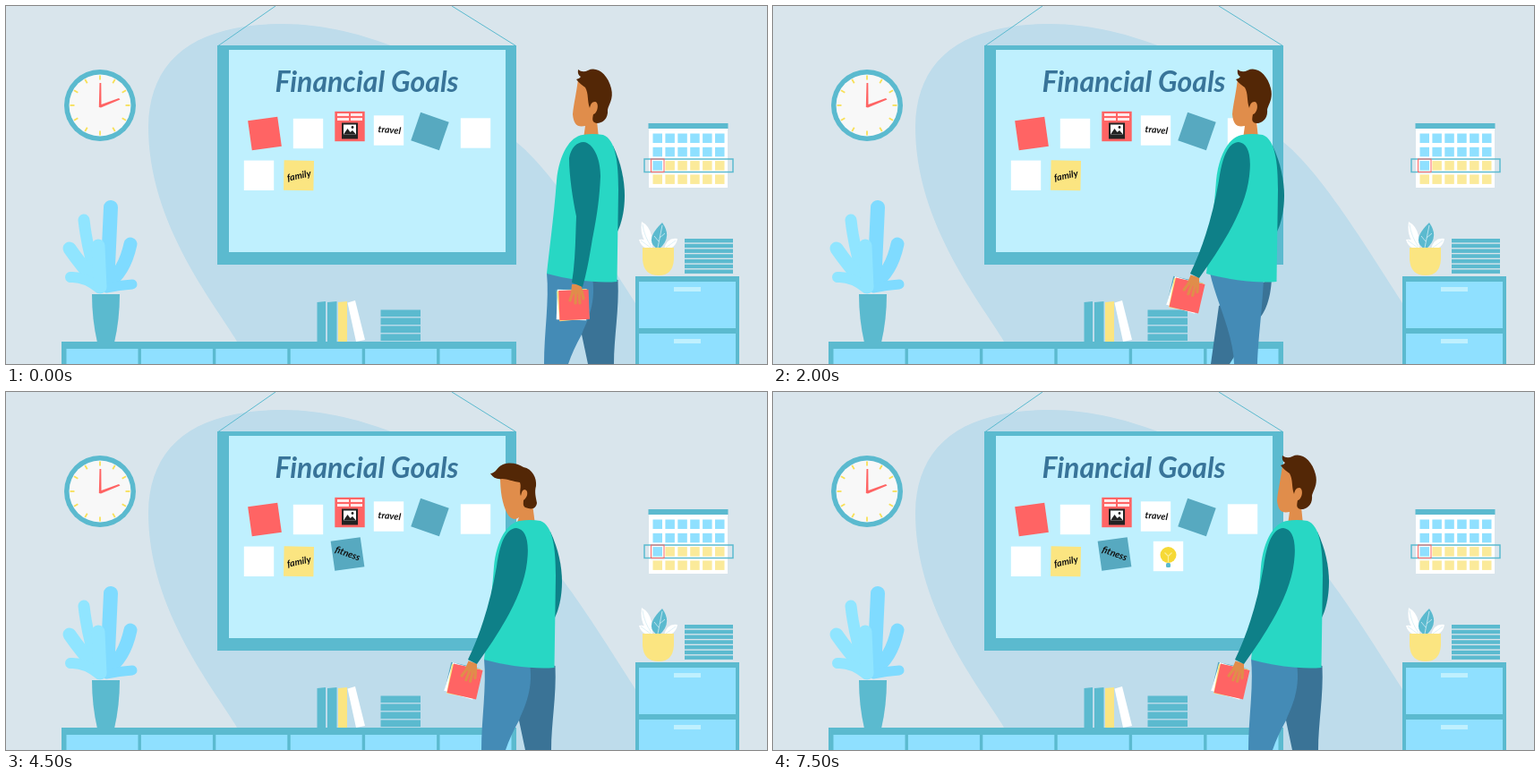
An HTML page for the animation above (8000 ms loop, 850x400 px).

```html
<!DOCTYPE html>
<html lang="en">
<head>
<meta charset="utf-8">
<title>Financial Goals</title>
<style>
  html, body { margin: 0; width: 100%; height: 100%; overflow: hidden; background: #d9e5ec; }
  svg { display: block; width: 100%; height: 100%; }
  text { font-family: Lato, "Open Sans", sans-serif; font-style: italic; font-weight: 700; text-anchor: middle; }
  .word { font-size: 10.5px; fill: #111; }
  .teal { fill: #5bbacf; }
  .sky { fill: #8fe0ff; }
  .pale { fill: #bff0fe; }
  .red { fill: #ff6464; }
  .white { fill: #fff; }
  .yellow { fill: #fbe581; }
  .note { fill: #57a9c0; }
  .skin { fill: #e08d4b; }
  .hair { fill: #532706; }
  .vest { fill: #28d7c4; }
  .sleeve { fill: #0e8088; }
  .far { fill: #0d6f74; }
  .leg { fill: #448bb6; }
  .leg2 { fill: #3a7396; }
  .lobe { fill: none; stroke-linecap: round; }
</style>
</head>
<body>
<svg viewBox="0 0 850 400" preserveAspectRatio="none">
  <defs>
    <rect id="sheet" x="-16.7" y="-16.7" width="33.4" height="33.4"/>
    <g id="fitNote">
      <use href="#sheet" class="note"/>
      <text class="word" y="3" transform="rotate(28)">fitness</text>
    </g>
    <g id="bulbNote">
      <use href="#sheet" class="white"/>
      <circle cy="-1.5" r="9" fill="#f6d936"/>
      <path d="M-4 -4L0 0L4 -4M0 0V7" fill="none" stroke="#fbee98" stroke-width="1.2"/>
      <rect x="-2.5" y="7.5" width="5" height="5" rx="1.5" class="teal"/>
    </g>
    <g id="stack">
      <use href="#sheet" class="note" transform="translate(-3 -1)"/>
      <use href="#sheet" class="white" transform="translate(-2.5) rotate(4)"/>
      <use href="#sheet" class="yellow" transform="translate(-1) rotate(-3)"/>
      <use href="#sheet" class="red"/>
    </g>
    <g id="hand">
      <path class="skin" d="M-5 -1L5 -1L8 9L-6 10Z"/>
      <path d="M-4 8L-7 17M-.5 8L-1 20M3 8L4 20M6 7L8 15" fill="none" stroke="#e08d4b" stroke-width="3.2" stroke-linecap="round"/>
    </g>
  </defs>

  <path fill="#bedceb" d="M275 400L258 375C235 335 159 245 159 135C160 60 210 20 310 20C355 20 400 32 440 48C500 75 530 120 570 152C612 186 660 265 703 332V400Z"/>

  <!-- board -->
  <path d="M237 44.500L301 0M569.500 44.500L498 0" stroke="#5bbacf" fill="none"/>
  <rect x="236" y="44" width="334" height="245" class="teal"/>
  <rect x="249" y="49" width="309" height="226" class="pale"/>
  <text x="403" y="96" font-size="32" fill="#387499">Financial Goals</text>
  <use href="#sheet" class="red" transform="translate(289 142.500) rotate(-8)"/>
  <use href="#sheet" class="white" x="337.500" y="142.500"/>
  <use href="#sheet" class="red" x="384" y="134.500"/>
  <path fill="#ffe9e9" d="M370 120h13v3h-13zM385 120h13v3h-13zM370 125h13v3h-13zM385 125h13v3h-13z"/>
  <rect x="375" y="130.500" width="18" height="18" fill="#222"/>
  <rect x="377" y="132.500" width="14" height="11" class="white"/>
  <path fill="#222" d="M377 143.500L381.500 137L384.500 141L387 139L391 143.500Z"/>
  <circle cx="387" cy="135.500" r="1.400" fill="#222"/>
  <use href="#sheet" class="white" x="427.500" y="139"/>
  <text class="word" transform="translate(428 142) rotate(5)">travel</text>
  <use href="#sheet" class="note" transform="translate(473.500 140) rotate(19)"/>
  <use href="#sheet" class="white" x="524.500" y="142"/>
  <use href="#sheet" class="white" x="282.500" y="189.300"/>
  <use href="#sheet" class="yellow" transform="translate(327 189.300) rotate(1)"/>
  <text class="word" transform="translate(328 193) rotate(-12)">family</text>
  <g id="fit" class="pose"><use href="#fitNote" transform="translate(381.500 181) rotate(-8)"/></g>
  <g id="bulb" class="pose"><use href="#bulbNote" x="441.500" y="183.500"/></g>

  <!-- clock -->
  <circle cx="105" cy="111" r="40" class="teal"/>
  <circle cx="105" cy="111" r="34.500" fill="#f8f8f8"/>
  <g id="ticks" stroke="#f8e058" stroke-width="1.800"></g>
  <path class="red" d="M103.800 113L104.500 86H106.300L106.500 110L126 103L127.500 104.500L106 113.500Z"/>

  <!-- tall plant -->
  <g class="lobe" stroke="#7fdbff">
    <path stroke-width="16" d="M117 225L113 312"/>
    <path stroke-width="15" d="M139 266Q132 298 113 310"/>
    <path stroke-width="11" d="M141 311Q126 312 113 315"/>
  </g>
  <g class="lobe" stroke="#90e5ff">
    <path stroke-width="13" d="M87 239Q91 275 104 312"/>
    <path stroke-width="15" d="M71 271Q84 290 104 312"/>
    <path stroke-width="12" d="M72 303Q88 302 104 315"/>
    <path stroke-width="15" d="M103 268L105 314"/>
  </g>
  <path class="teal" d="M96 322H127Q127 350 121 376H102Q96 350 96 322Z"/>

  <!-- sideboard and books -->
  <rect x="62" y="375" width="508" height="25" class="teal"/>
  <g id="doors" class="sky"></g>
  <path class="teal" d="M347.500 331L357 330V375H347.500ZM359 331L369.500 330V375H359Z"/>
  <path class="yellow" d="M371 331L381 330V375H371Z"/>
  <path class="white" d="M381.500 331.500L390 329L401 373L391 375Z"/>
  <g id="books" class="teal"></g>

  <!-- calendar -->
  <rect x="718" y="131" width="88" height="72" class="white"/>
  <rect x="717.500" y="131" width="89" height="6" class="teal"/>
  <g id="days"></g>
  <rect x="713" y="171" width="99" height="14.500" fill="none" stroke="#5bbacf" stroke-width="1.500"/>
  <rect x="720.500" y="171" width="14.500" height="14.500" fill="none" stroke="#f66"/>

  <!-- cabinet -->
  <rect x="703" y="302" width="116" height="98" class="teal"/>
  <path class="sky" d="M707 308H815V360H707ZM707 366H815V400H707Z"/>
  <path class="pale" d="M746 314H776V319H746ZM746 372H776V377H746Z"/>
  <path class="white" d="M710 241Q723 248 722 270Q707 262 710 241ZM707 261Q720 259 723 272Q710 272 707 261ZM750 260Q738 258 735 272Q748 272 750 260Z"/>
  <path class="teal" d="M733 242Q745 259 729 272Q711 263 733 242Z"/>
  <path d="M711 244Q713 258 721 269M748 262L737 270M709 262L720 270M733 245L728 270M730 259L736 254M729 263L724 257" fill="none" stroke="#d5edf4" stroke-width=".8"/>
  <path class="yellow" d="M711 270H746V283Q745 301 729 301Q712 301 711 283Z"/>

  <!-- man, drawn at x offset 0 -->
  <g id="man">
    <g id="rest" class="pose"><path class="sleeve" d="M608 156C617 175 621 195 621 212C621 230 617 244 613 252Z"/></g>
    <g id="pull" class="pose">
      <path class="far" d="M503 167L550 184V212L537 206L499 175Z"/>
    </g>
    <g id="reach" class="pose">
      <path class="far" d="M441 183L550 178V208L535 206L441 191Z"/>
    </g>

    <g id="stand" class="pose">
      <path class="leg2" d="M575 298L613.500 306C615 340 609 370 609 400H580L573 367Z"/>
      <path class="leg" d="M534 298L585 304C590 335 576 358 573 367Q563 385 558 400H531C531 365 537 330 534 298Z"/>
    </g>
    <g id="step" class="pose">
      <path class="leg2" d="M607 304C606 330 598 346 590 352L560 400H539L548 335Z"/>
      <path class="leg" d="M538 298L598 305C596 345 592 370 591 400H565C564 365 545 330 538 298Z"/>
    </g>

    <g id="up" class="pose">
      <path class="skin" d="M569 82C567 98 564 110 563 121C564 132 568 136 577 134L575 148H592L590 128L594 95Z"/>
      <path class="hair" d="M569 71Q574 75 580 72C590 67 602 76 606 92C609 104 603 110 602 116C603 126 596 131 590 131C584 130 585 126 586 121C591 120 593 108 588 107C584 107 583 110 582 114C579 106 581 98 577 91C574 89 570 86 567 82Q571 81 572 79Q568 77 569 71Z"/>
    </g>
    <g id="down" class="pose">
      <path class="skin" d="M552 94C552 110 554 125 560 136C564 143 569 143 573 140L570 148H591L588 125L584 96Z"/>
      <path class="hair" d="M541 91C547 91 548 84 555 81C563 78 572 80 578 84C588 86 593 96 592 105C590 112 592 118 593 124C592 130 588 132 580 129C577 127 578 124 578 121C583 118 584 109 579 109C576 110 576 113 575 116C573 111 576 106 574 101C566 100 560 97 554 97C549 98 544 96 541 91Z"/>
    </g>

    <path class="vest" d="M574 144C560 146 548 165 545 195C542 235 537 270 534 299C560 306 590 310 612.500 308L614 205C614 175 611 149 597 144Q585 142 574 144Z"/>

    <g id="heldFit" class="pose"><use href="#fitNote"/></g>
    <g id="heldBulb" class="pose"><use href="#bulbNote"/></g>
    <g id="farHand" class="pose">
      <path class="skin" d="M1 -5L-3 -10Q-6 -11 -5 -5L-6 0Q-4 3 -1 4L3 7L6 0Z"/>
    </g>

    <g id="hang" class="pose">
      <use href="#stack" transform="translate(564.500 334) rotate(-2)"/>
      <use href="#hand" transform="translate(567 312)"/>
      <path class="sleeve" d="M575 152C586 153 594 170 594 190C593 215 590 235 585 260C581 285 578 300 574 314L562 309C566 285 566 260 567 235C563 215 559 190 559 170C561 158 568 152 575 152Z"/>
    </g>
    <g id="low" class="pose">
      <use href="#stack" transform="translate(512.500 323.500) rotate(13)"/>
      <use href="#hand" transform="translate(521 303) rotate(18)"/>
      <path class="sleeve" d="M570 152C580 153 585 165 582 190C578 225 556 262 526 304L516 299C530 270 541 235 548 195C552 168 558 153 570 152Z"/>
    </g>
    <g id="raised" class="pose">
      <use href="#stack" transform="translate(479 155) rotate(-12) scale(-1 1)"/>
      <use href="#hand" transform="translate(482 179) rotate(165)"/>
      <path class="sleeve" d="M570 153C580 153 583 168 580 185C576 205 562 225 550 237C545 239 538 236 532 232C515 222 498 208 479 184L485 177C500 188 520 198 537 206C543 185 553 160 570 153Z"/>
    </g>
  </g>
</svg>
<script>
  const $ = id => document.getElementById(id);
  const repeat = (id, n, draw) => {
    $(id).innerHTML = Array.from({ length: n }, (_, i) => draw(i)).join('');
  };
  const rect = (x, y, w, h, more = '') =>
    `<rect x="${x}" y="${y}" width="${w}" height="${h}" ${more}/>`;

  repeat('ticks', 12, i => `<path d="M105 77.500v5" transform="rotate(${i * 30} 105 111)"/>`);
  repeat('doors', 6, i => rect(67.5 + i * 83.4, 383, 80, 17));
  repeat('books', 11, i => i < 4
    ? rect(418.5, 339.5 + i * 9, 44.5, 7.6)
    : rect(758, 260 + (i - 4) * 5.75, 54, 4.4));
  repeat('days', 24, i => {
    const row = Math.floor(i / 6);
    const tone = row < 2 || i === 12 ? 'sky' : 'yellow';
    return rect(722.5 + (i % 6) * 13.9, 142.5 + row * 15.3, 10.5, 10.5,
      `class="${tone}" opacity="${tone === 'sky' ? 1 : 0.8}"`);
  });

  // One pose per half second: x offset, then the visible parts.
  const STEP = 500;
  const poses = [
    '70 up stand hang rest',
    '70 up stand hang rest',
    '40 up step low rest',
    '-10 up stand hang rest',
    '-50 up step low rest',
    '-50 down step raised rest',
    '-50 down step raised pull farHand',
    '-50 down step low pull farHand heldFit',
    '-50 down step low reach farHand heldFit',
    '0 down stand low rest fit',
    '0 down stand raised rest fit',
    '0 down stand raised pull farHand fit',
    '0 down stand low pull farHand fit heldBulb',
    '0 down stand low reach farHand fit heldBulb',
    '0 down stand low rest fit bulb',
    '0 up stand low rest fit bulb'
  ].map(p => p.split(' '));
  const parts = document.querySelectorAll('.pose');
  const start = performance.now();

  function frame(now) {
    const t = Math.max(0, now - start);
    const [x, ...shown] = poses[Math.floor(t / STEP) % poses.length];
    const far = shown.includes('reach');
    const held = `translate(${far ? '420 179' : '482 153'}) rotate(18)`;
    $('man').setAttribute('transform', `translate(${x} 0)`);
    $('heldFit').setAttribute('transform', held);
    $('heldBulb').setAttribute('transform', held);
    $('farHand').setAttribute('transform', `translate(${far ? '438 187' : '499 169'})`);
    for (const p of parts) p.style.display = shown.includes(p.id) ? '' : 'none';
    requestAnimationFrame(frame);
  }
  frame(start);
</script>
</body>
</html>
```
